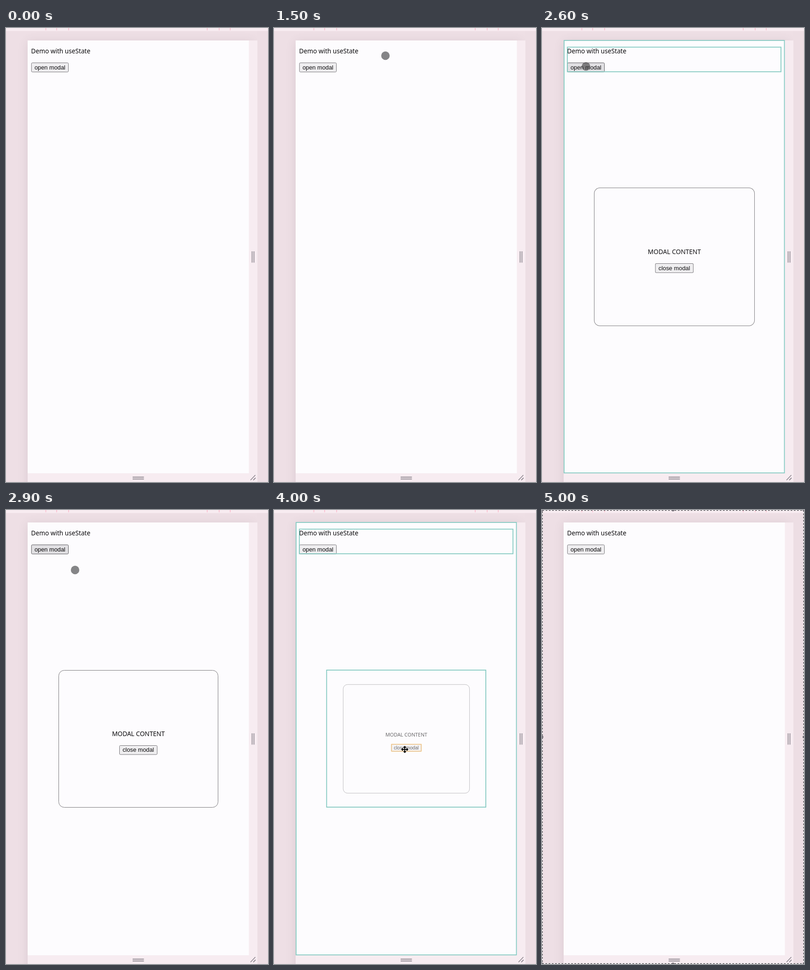
Animation of 569x984 px, one loop 6.1 s. Source, as an HTML page:

```html
<!DOCTYPE html>
<html lang="en">
<head>
<meta charset="utf-8">
<title>Modal demo</title>
<style>
  html, body { margin: 0; width: 100%; height: 100%; overflow: hidden; background: #eedfe5; }
  svg { display: block; width: 569px; height: 984px; }
  .copy { font: 13.65px "Noto Sans", "Open Sans", sans-serif; fill: #0b0a0c; }
  .label { font: 12.8px "Liberation Sans", Arial, sans-serif; fill: #0b0a0c; }
  .button { fill: #efeef0; stroke: #77757a; }
  .button.hover { fill: #e1e0e3; stroke: #5c5a5f; }
  .grip { stroke: #918b93; stroke-width: 1.8; fill: none; }
  .update { fill: none; stroke: #83c9c1; stroke-width: 1.8; }
</style>
</head>
<body>
<svg viewBox="0 0 569 984">
  <defs>
    <filter id="soft" x="-20%" y="-20%" width="140%" height="140%"><feGaussianBlur stdDeviation="11"/></filter>
  </defs>
  <rect width="569" height="984" fill="#eedfe5"/>
  <rect x="47" y="30" width="490" height="980" fill="#50404c" opacity=".13" filter="url(#soft)"/>
  <rect x="546" y="6" width="23" height="978" fill="#eddee4"/>
  <rect width="569" height="6.5" fill="#f8ecf1"/>
  <path d="M86.5 0v5M110 0v5M136 0v5M437 0v5M463 0v5M487 0v5" stroke="#fbc6d4" stroke-width="2"/>
  <rect x="47" y="27" width="499" height="957" fill="#f7ecf1"/>
  <rect x="47" y="27" width="480.5" height="938" fill="#fdfcfe"/>
  <path class="grip" d="M534.5 484v24.5M538.5 484v24.5M275 973.5h24.5M275 977.5h24.5M531 980l10.5-11M537 980l5-5"/>

  <text class="copy" x="54.5" y="55">Demo with useState</text>
  <rect id="open" class="button" x="55.3" y="75.5" width="80.2" height="19.8" rx="2"/>
  <text class="label" x="62" y="89.6">open modal</text>

  <g id="modal">
    <rect x="114.5" y="347.5" width="346" height="297" rx="12" fill="#fdfcfe" stroke="#7b797d"/>
    <text class="copy" x="287.5" y="489.6" text-anchor="middle">MODAL CONTENT</text>
    <rect class="button" x="246.5" y="510.5" width="81.8" height="19.5" rx="2"/>
    <text class="label" x="287.3" y="524.4" text-anchor="middle">close modal</text>
  </g>

  <g id="updates">
    <rect class="update" x="48" y="27" width="478.5" height="937.3"/>
    <rect class="update" x="55" y="41.5" width="464" height="53.3"/>
  </g>
  <g id="exitUpdates">
    <rect class="update" x="114.3" y="347" width="345.7" height="297"/>
    <rect class="update" x="255.3" y="507.8" width="64.4" height="15" style="stroke:#f0c88f"/>
  </g>

  <circle id="touch" r="9.2" fill="#3c3b3e" fill-opacity=".62"/>
  <g id="move">
    <path id="arrows" d="M-6 0H6M0-6V6M-4-2.5L-6.5 0L-4 2.5M4-2.5L6.5 0L4 2.5M-2.5-4L0-6.5L2.5-4M-2.5 4L0 6.5L2.5 4"
          fill="none" stroke="#0a0a0a" stroke-width="2" stroke-linejoin="round"/>
  </g>

  <g id="selection">
    <rect x=".75" y=".75" width="567.5" height="982.5" fill="none" stroke="#fff" stroke-width="1.5"/>
    <rect x=".75" y=".75" width="567.5" height="982.5" fill="none" stroke="#5f5b60" stroke-width="1.5" stroke-dasharray="4 3"/>
    <g id="knobs" fill="#77737a"></g>
  </g>
</svg>
<script>
const LOOP = 6100;
const el = id => document.getElementById(id);

// time, kind, x, y
const pointer = [
  [0], [400, "touch", 342, 164], [500, "touch", 282, 130], [600, "touch", 202, 92],
  [700, "touch", 134, 64], [800, "touch", 99, 57], [900, "touch", 101, 76],
  [1000, "move", 108, 87], [1100, "touch", 160, 76], [1200, "touch", 235, 61],
  [1300, "touch", 279, 54], [1500, "touch", 242, 60], [1600, "touch", 168, 72],
  [1700, "touch", 112, 82], [1800, "touch", 94.3, 83], [2200, "touch", 95.5, 83.2],
  [2900, "touch", 150, 130], [3000, "touch", 290, 270], [3100, "touch", 440, 440],
  [3200, "touch", 525, 570], [3300, "touch", 410, 608], [3400, "touch", 296.5, 526.3],
  [3500, "touch", 274, 522], [3600, "touch", 274, 518], [3700, "touch", 274, 514],
  [3900, "move", 280, 518], [4000, "move", 284, 519], [4100, "move", 290, 515],
  [4200, "touch", 295, 512], [4500, "touch", 127, 99], [4600]
];

// time, scale, opacity
const modal = [
  [0, 1, 0], [2400, .62, .3], [2500, .9, .75], [2600, 1.006, .97], [2700, 1, 1],
  [3900, .93, .82], [4000, .793, .6], [4100, .62, .25], [4200, 1, 0]
];

const at = (table, t) => table.findLast(row => row[0] <= t);
const during = (t, from, to) => t >= from && t < to;
const show = (id, on) => { el(id).style.display = on ? "" : "none"; };

el("knobs").innerHTML = [[0, 0], [284.5, 0], [569, 0], [0, 492], [569, 492], [0, 984], [284.5, 984], [569, 984]]
  .map(([x, y]) => `<circle cx="${x}" cy="${y}" r="3"/>`).join("");

function draw(t) {
  const [, kind, x, y] = at(pointer, t);
  for (const id of ["touch", "move"]) {
    show(id, id === kind);
    if (id === kind) el(id).setAttribute("transform", `translate(${x} ${y})`);
  }

  const [, scale, opacity] = at(modal, t);
  show("modal", opacity > 0);
  el("modal").setAttribute("opacity", opacity);
  el("modal").setAttribute("transform", `translate(287.3 496) scale(${scale}) translate(-287.3 -496)`);

  const closing = during(t, 3900, 4200);
  show("updates", closing || during(t, 2400, 2700));
  show("exitUpdates", closing);
  el("open").classList.toggle("hover", during(t, 2400, 3900));
  show("selection", t >= 4800);
}

let start;
function tick(now) {
  start ??= now;
  draw((now - start) % LOOP);
  requestAnimationFrame(tick);
}
draw(0);
requestAnimationFrame(tick);
</script>
</body>
</html>
```
